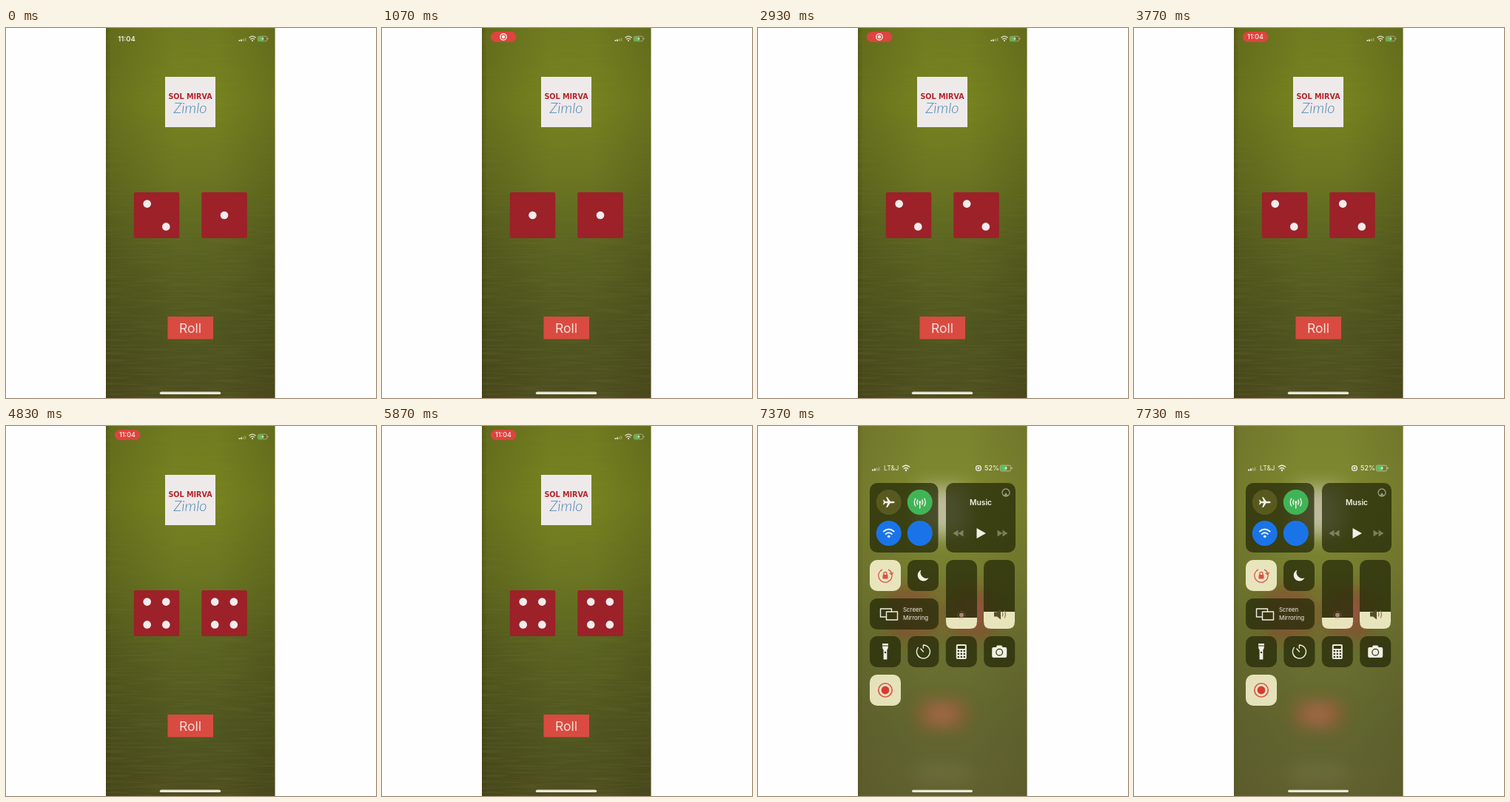
An HTML page that plays this animation: 500x500 px, repeating every 7760 ms.

```html
<!DOCTYPE html>
<html lang="en">
<head>
<meta charset="utf-8">
<title>Dice roll</title>
<style>
  html, body { margin: 0; width: 100%; height: 100%; overflow: hidden; background: #fefefe; }
  svg { display: block; width: 100vw; height: 100vh; }
  text { font-family: Inter, Roboto, sans-serif; fill: #f1f0e6; }
  .line { fill: none; stroke: #f1f0e6; stroke-width: 1.4; stroke-linecap: round; stroke-linejoin: round; }
  .solid { fill: #f1f0e6; }
</style>
</head>
<body>
<svg viewBox="0 0 500 500" id="stage">
  <defs>
    <linearGradient id="felt" x2="0" y2="1">
      <stop offset="0" stop-color="#707d1f"/>
      <stop offset=".2" stop-color="#788520"/>
      <stop offset=".4" stop-color="#6b7721"/>
      <stop offset=".6" stop-color="#5a6321"/>
      <stop offset=".8" stop-color="#505620"/>
      <stop offset="1" stop-color="#4d4e20"/>
    </linearGradient>
    <linearGradient id="sides">
      <stop offset="0" stop-color="#332f0c" stop-opacity=".45"/>
      <stop offset=".03" stop-color="#332f0c" stop-opacity=".22"/>
      <stop offset=".4" stop-color="#332f0c" stop-opacity="0"/>
      <stop offset=".65" stop-color="#332f0c" stop-opacity="0"/>
      <stop offset="1" stop-color="#332f0c" stop-opacity=".22"/>
    </linearGradient>
    <filter id="grain" x="0" y="0" width="1" height="1">
      <feTurbulence type="fractalNoise" baseFrequency=".018 .42" numOctaves="2" seed="4"/>
      <feColorMatrix values="0 0 0 0 .16  0 0 0 0 .17  0 0 0 0 .03  1.6 0 0 0 -.62"/>
    </filter>
    <filter id="soften" filterUnits="userSpaceOnUse" x="90" y="0" width="320" height="520">
      <feGaussianBlur id="appBlur" stdDeviation="0"/>
    </filter>
    <filter id="focus" filterUnits="userSpaceOnUse" x="135" y="0" width="230" height="500">
      <feGaussianBlur id="panelBlur" stdDeviation="0"/>
    </filter>
    <clipPath id="phone"><rect x="135" width="228.5" height="500"/></clipPath>
  </defs>
  <g clip-path="url(#phone)">
    <rect x="135" width="229" height="500" fill="url(#felt)"/>
    <rect x="135" width="229" height="500" fill="url(#sides)"/>
    <rect id="streaks" x="135" width="229" height="500" filter="url(#grain)"/>
    <rect id="veil" x="135" width="229" height="500" fill="#95935a"/>
    <g id="app">
      <rect x="215" y="66" width="68" height="68" fill="#eeeaea"/>
      <text x="249" y="95.5" text-anchor="middle" style="font:bold 9.6px 'DejaVu Sans',sans-serif;fill:#b3242a">SOL MIRVA</text>
      <text x="249" y="115" text-anchor="middle" style="font:italic 300 20px Lato,sans-serif;fill:#4b82b6">Zimlo</text>
      <g id="dice"></g>
      <rect x="218.5" y="390" width="61.5" height="30.5" fill="#d94b40"/>
      <text x="249" y="412" text-anchor="middle" font-size="17.5" style="fill:#f3dfdb">Roll</text>
      <rect x="208" y="491.7" width="82" height="3.2" rx="1.6" fill="#ebe6dc"/>
    </g>
    <g id="statusBar">
      <text id="clock" x="163" y="17.5" text-anchor="middle" font-size="9.4" font-weight="600">11:04</text>
      <g id="pill">
        <rect x="147" y="5" width="34.5" height="14" rx="7" fill="#de433f"/>
        <g id="pillIcon"><circle class="line" cx="164" cy="12" r="4.2" stroke-width="1.2"/><circle class="solid" cx="164" cy="12" r="2.3"/></g>
        <text id="pillTime" x="164" y="15.4" text-anchor="middle" font-size="9" font-weight="500">11:04</text>
      </g>
      <g id="appSignals" opacity=".88"></g>
    </g>
    <g id="panelStatus"></g>
    <g id="panels"></g>
    <rect id="home" x="208" y="491.7" width="82" height="3.2" rx="1.6" fill="#ebe6dc"/>
  </g>
</svg>
<script>
const LOOP = 7760;
const byId = id => document.getElementById(id);
const clamp = v => Math.max(0, Math.min(1, v));
const smooth = v => { v = clamp(v); return v * v * (3 - 2 * v); };
const opacity = (id, v) => byId(id).setAttribute('opacity', clamp(v).toFixed(3));

// Blurs a group through its filter, or drops the filter when it is sharp
function setBlur(id, filter, amount) {
  byId(id + 'Blur').setAttribute('stdDeviation', amount);
  const group = byId(id === 'panel' ? 'panels' : id);
  if (amount) group.setAttribute('filter', `url(#${filter})`);
  else group.removeAttribute('filter');
}

// Dice: start time, left value, right value
const ROLLS = [[0, 2, 1], [800, 1, 1], [1560, 6, 6], [2900, 2, 2], [4800, 4, 4], [6400, 1, 1]];

function pips(n) {
  const spots = [];
  if (n % 2) spots.push([0, 0]);
  if (n > 1) spots.push([-1, -1], [1, 1]);
  if (n > 3) spots.push([1, -1], [-1, 1]);
  if (n > 5) spots.push([-1, 0], [1, 0]);
  return spots;
}

const die = (cx, n) => `<g transform="translate(${cx} 253)">
  <rect x="-30.7" y="-31" width="61.5" height="62" rx="2" fill="#9c2129"/>` +
  pips(n).map(([x, y]) => `<circle cx="${x * 12.8}" cy="${y * 15.4}" r="5.3" fill="#f3ecec"/>`).join('') + '</g>';

// Small glyphs, centred on the given point
const at = (x, y, body, scale = 1) => `<g transform="translate(${x} ${y}) scale(${scale})">${body}</g>`;
const wifi = `<path class="line" d="M-5-1.8Q0-6 5-1.8M-3 .7Q0-1.8 3 .7"/><circle class="solid" cy="3" r="1.3"/>`;
const signal = [0, 1, 2, 3].map(i =>
  `<rect class="solid" x="${i * 2.8}" y="${-2 - i}" width="2" height="${2 + i}" rx=".5" opacity="${i < 2 ? 1 : .35}"/>`).join('');
const battery = `<rect x="-7" y="-3.5" width="13" height="7" rx="2" fill="none" stroke="#cfd0bd" stroke-width=".7"/>
  <rect x="-6" y="-2.6" width="7" height="5.2" rx="1" fill="#45d060"/><path class="solid" d="M1-3-2 .6H0L-1 3 2-.6H0z"/>
  <rect x="6.8" y="-1" width="1" height="2" fill="#cfd0bd"/>`;

byId('appSignals').innerHTML = at(314.5, 18, signal, .95) + at(333, 14.5, wifi, .85) + at(347, 14.5, battery, .95);
byId('panelStatus').innerHTML = `<g id="leftStatus">${at(154, 60.5, signal)}
    <text x="170" y="60" font-size="8.8">LT&amp;J</text>${at(200, 57, wifi, .95)}</g>
  <g id="rightStatus"><circle class="line" cx="298" cy="57" r="3.4" stroke-width="1"/><circle class="solid" cx="298" cy="57" r="1.4"/>
    <text x="306" y="60.2" font-size="9" font-weight="500">52%</text>${at(335, 57, battery, 1.1)}</g>`;

// Control panels: each tile is drawn around its own centre
const RED = '#dc5148';
const disc = (x, y, color, body = '') => at(x, y, `<circle r="17" fill="${color}"/>${body}`);
const skip = dir => `<path class="solid" opacity=".35" transform="scale(${dir} 1)" d="M-7-4.5 0 0-7 4.5zM0-4.5 7 0 0 4.5z"/>`;
const plane = `<path class="solid" d="M8 0Q8-1.2 5.5-1.2H2L-2-7H-3.6L-1.5-1.2H-5L-6.6-3.2H-7.8L-6.8 0-7.8 3.2H-6.6L-5 1.2H-1.5L-3.6 7H-2L2 1.2H5.5Q8 1.2 8 0z"/>`;
const antenna = `<circle class="solid" r="1.7"/><path class="line" stroke-width="1.1"
  d="M0 1V8M-3-3Q-5 0-3 3M3-3Q5 0 3 3M-6-5Q-9 0-6 5M6-5Q9 0 6 5"/>`;
const rotateLock = `<path d="M-4-8.2A9.2 9.2 0 1 0 8.6-3M4-8.2A9.2 9.2 0 0 1 8.6-3M6-3.4 8.7-1 10.6-4.3" fill="none" stroke="${RED}" stroke-width="1.3"/>
  <rect x="-3.5" y="-1" width="7" height="5.4" rx="1" fill="${RED}"/><path d="M-2-1V-2.6A2 2 0 0 1 2-2.6V-1" fill="none" stroke="${RED}" stroke-width="1.3"/>`;
const moon = `<path class="solid" d="M-2.5-7.5A7.8 7.8 0 1 0 7.5 3.2 7.8 7.8 0 0 1-2.5-7.5z"/>`;
const torch = `<path class="solid" d="M-4-11H4V-8.6H-4zM-4-7.5H4Q4-4 2.4-2.5V10.5H-2.4V-2.5Q-4-4-4-7.5z"/><circle cy="1" r="1.2" fill="#343912"/>`;
const timer = `<path class="line" stroke-width="2" d="M0-9V-5M0-9A9 9 0 1 1-7-5.6"/><path class="line" stroke-width="2" d="M-3.5-4 0 0"/>`;
const calculator = `<rect class="solid" x="-7" y="-10" width="14" height="20" rx="2"/><rect x="-5" y="-8" width="10" height="4" fill="#343912"/>` +
  [...Array(9).keys()].map(i => `<circle cx="${(i % 3 - 1) * 4}" cy="${Math.floor(i / 3) * 4 - 1}" r="1.3" fill="#343912"/>`).join('');
const camera = `<path class="solid" d="M-8-6H-4.5L-3-8.5H3L4.5-6H8Q10-6 10-4V6Q10 8 8 8H-8Q-10 8-10 6V-4Q-10-6-8-6z"/>
  <circle cy=".7" r="4.3" fill="none" stroke="#343912" stroke-width="1.3"/>`;
const record = `<circle r="9.2" fill="none" stroke="${RED}" stroke-width="1.6"/><circle r="5.4" fill="#dc3a33"/>`;
const screens = `<path class="line" d="M-4 4H-11V-7H4V-3M-3-3H12V8H-3z"/>`;
const slider = (level, icon) => `<path d="M-21 ${level}H21V37Q21 46.5 11 46.5H-11Q-21 46.5-21 37z" fill="#e8e5bd"/>${icon}`;
const sun = `<circle cy="28" r="3" fill="#a98674"/><circle cy="28" r="5" fill="none" stroke="#a98674" stroke-dasharray="1 2.1"/>`;
const speaker = `<path d="M-7 24H-3L2 20V34L-3 30H-7z" fill="#554e2c"/><path d="M4 24Q6 27 4 30M7 22Q10 27 7 32" fill="none" stroke="#8b8455" stroke-width="1.2"/>`;

const TILES = [];
function tile(x, y, w, h, body, light) {
  const group = document.createElementNS('http://www.w3.org/2000/svg', 'g');
  group.innerHTML = `<rect x="${-w / 2}" y="${-h / 2}" width="${w}" height="${h}" rx="10"
    fill="${light ? '#e8e5bd' : '#272c0a'}" opacity="${light ? 1 : .76}"/>${body}`;
  byId('panels').append(group);
  TILES.push({ group, cx: x + w / 2, cy: y + h / 2 });
}

tile(151, 77, 92.5, 94, disc(-20.5, -21, '#57591f', plane) + disc(21.5, -21, '#41b457', antenna) +
  disc(-20.5, 21, '#1a74e8', at(0, 0, wifi, 1.4)) + disc(21.5, 21, '#1a74e8'));
tile(254, 77, 94, 94, `<text y="-17" text-anchor="middle" font-size="10.3" font-weight="600">Music</text>
  <g opacity=".5">${at(34, -34, '<circle class="line" r="5" stroke-width="1"/><path class="solid" d="M0 0 3.5 5H-3.5z"/>')}</g>
  <path class="solid" d="M-5.5 14 7 21-5.5 28z"/>` + at(-30.5, 21, skip(-1)) + at(29.5, 21, skip(1)));
tile(151, 181, 42, 42, rotateLock, true);
tile(202, 181, 42, 42, moon);
tile(254, 181, 42, 93, slider(31.5, sun));
tile(305, 181, 42, 93, slider(23.5, speaker));
tile(151, 233, 93, 42, at(-21, 0, screens) +
  `<text x="-1.5" y="-2.7" font-size="7.9">Screen</text><text x="-1.5" y="8" font-size="7.9">Mirroring</text>`);
[torch, timer, calculator, camera].forEach((icon, i) => tile(151 + i * 51.4, 284, 42, 42, icon));
tile(151, 336, 42, 42, record, true);

let shownRoll;
function draw(t) {
  const roll = ROLLS.filter(r => r[0] <= t).pop();
  if (roll !== shownRoll) {
    byId('dice').innerHTML = die(203.5, roll[1]) + die(295, roll[2]);
    shownRoll = roll;
  }

  const pill = smooth((t - 780) / 200), time = smooth((t - 2900) / 200);
  opacity('clock', 1 - pill);
  opacity('pill', pill);
  opacity('pillIcon', 1 - time);
  opacity('pillTime', time);

  // The app blurs and shrinks back while the control panels come forward
  const open = smooth((t - 6780) / 580), rest = 1 - open;
  const depth = 1 - .1 * open;
  setBlur('app', 'soften', 10 * Math.sqrt(open) + 5 * open);
  setBlur('panel', 'focus', 2.4 * rest);
  byId('app').setAttribute('transform', `translate(249 250) scale(${depth}) translate(-249 -250)`);
  opacity('app', 1 - .35 * open * open);
  opacity('streaks', .4 * rest);
  opacity('veil', .27 * smooth(open * 1.4));
  opacity('statusBar', 1 - 3 * open);
  opacity('home', open ? 2 * open - 1 : 1);
  opacity('leftStatus', open * 1.6 - .3);
  opacity('rightStatus', open * 2 - .1);
  byId('leftStatus').setAttribute('transform', `translate(${24 * rest} ${-21 * rest})`);
  byId('rightStatus').setAttribute('transform', `translate(${16 * rest} ${-21 * rest})`);
  for (const { group, cx, cy } of TILES) {
    group.setAttribute('transform', `translate(${cx} ${cy - 22 * rest}) scale(${1 - .36 * rest})`);
    group.setAttribute('opacity', clamp(2.75 * open - .54 - cy / 290));
  }
}

const start = performance.now();
function tick() {
  draw((performance.now() - start) % LOOP);
  requestAnimationFrame(tick);
}
tick();
</script>
</body>
</html>
```
